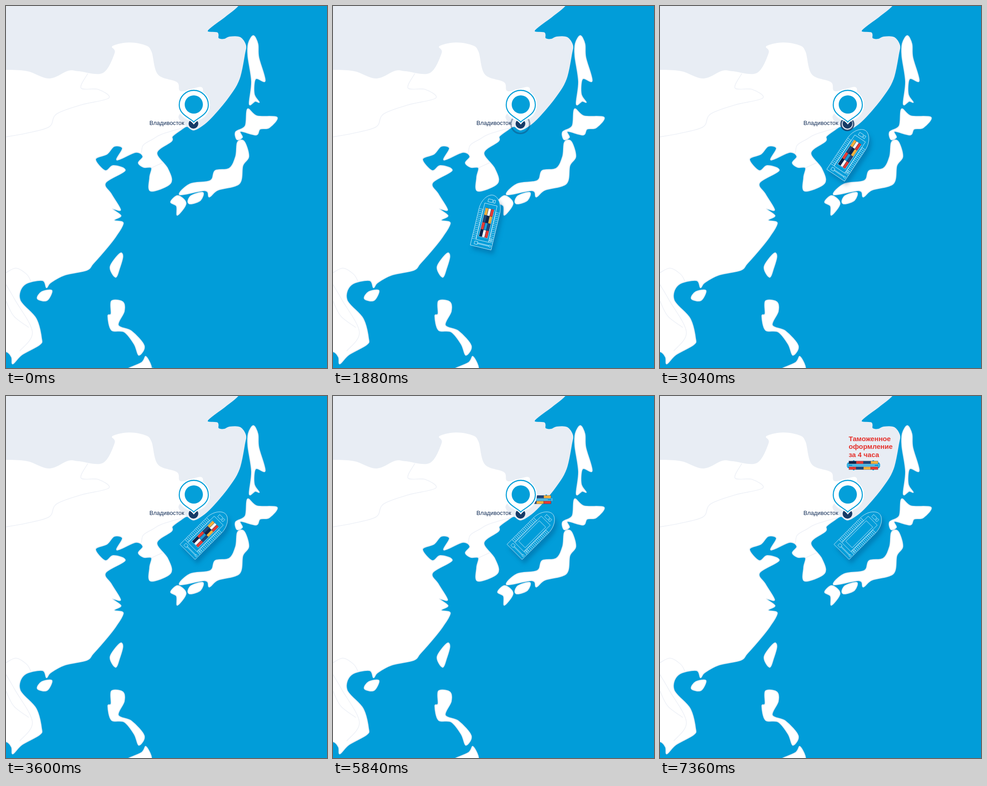
These frames come from a looping animation (706x794 px, 8000 ms). An HTML page:

```html
<!DOCTYPE html>
<html lang="ru">
<head>
<meta charset="utf-8">
<style>
html, body { margin: 0; width: 100%; height: 100%; overflow: hidden; background: #019dd9; }
svg { display: block; width: 706px; height: 794px; }
text { font-family: "Liberation Sans", Arial, sans-serif; }
.land { fill: #fff; stroke: #e5edf5; stroke-width: 1.8; stroke-linejoin: round; }
.border { fill: none; stroke: #eef1f7; stroke-width: 1.6; }
.lines { fill: none; stroke: #d5effb; stroke-width: .9; }
#float { filter: drop-shadow(5px 9px 5px rgba(0, 50, 100, .28)); }
</style>
</head>
<body>
<svg viewBox="0 0 706 794">
  <defs><path id="pin" d="M413 254.5C406 246 381 239 381 217A32 32 0 0 1 445 217C445 239 420 246 413 254.5Z"/></defs>
  <g id="map"></g>
  <text x="315.5" y="261" font-size="12.8" fill="#0f2b55">Владивосток</text>
  <circle id="pulse" cx="412" cy="259" fill="none" stroke="#163a66" stroke-width="3.4"/>
  <circle cx="412.3" cy="258.3" r="10.6" fill="#163a66"/>

  <g id="float"><g id="ship" class="lines">
    <path fill="#019dd9" d="M-23.5 59V-24C-23-44-11-59 0-59S23-44 23.5-24V59Z"/>
    <path d="M-14-38H14V44H-14ZM-10-28H10V36H-10Z"/>
    <path d="M-8-49H2V-42.5H-8ZM4-49H8V-42.5H4ZM-16 48H-9V54.5H-16ZM17 35H20V41H17Z"/>
    <path d="M-9 50.5H17M-9 52.3H17"/>
    <circle cx="19" cy="51.4" r="2.2"/>
    <path d="M-14.5-25V44M14.5-25V44"/>
    <path stroke-width="8" stroke-dasharray=".8 3.4" d="M-19-24V44M19-24V44"/>
  </g></g>

  <g id="cargo">
    <g id="wagon" fill="#079bd8">
      <path d="M-23-11h3v22h-3zM20-11h3v22h-3z"/>
      <path d="M-35-6H-32.5V6H-35ZM32.5-6H35V6H32.5ZM-36.5-3.5H36.5V3.5H-36.5Z"/>
      <path stroke="#d9f0fb" stroke-width=".9" d="M-32-2.6H32M-32 2.6H32M-34-3V3M34-3V3M-25 0H25"/>
    </g>
    <g id="middle"></g>
    <g id="strips"></g>
  </g>

  <circle cx="413" cy="217" r="35.5" fill="#fff"/>
  <use href="#pin" fill="#fff" stroke="#fff" stroke-width="7"/>
  <use href="#pin" fill="#fff" stroke="#049fd9" stroke-width="2.3"/>
  <circle cx="413" cy="216" r="20" fill="#049fd9"/>

  <g id="note" font-size="15.2" font-weight="bold" fill="#e5322d">
    <text x="415" y="99">Таможенное</text>
    <text x="415" y="116.3">оформление</text>
    <text x="415" y="133.6">за 4 часа</text>
  </g>
</svg>
<script>
const $ = id => document.getElementById(id);

// Smooth curve through "x,y x,y ..." points
function curve(text, closed) {
  const p = text.trim().split(/\s+/).map(s => s.split(',').map(Number)), k = p.length;
  const at = i => closed ? p[(i + k) % k] : p[Math.max(0, Math.min(k - 1, i))];
  let d = 'M' + p[0];
  for (let i = 0; i < (closed ? k : k - 1); i++) {
    const [a, b, c, e] = [at(i - 1), at(i), at(i + 1), at(i + 2)];
    const near = b.map((v, j) => v + (c[j] - a[j]) / 6);
    const far = c.map((v, j) => v - (e[j] - b[j]) / 6);
    d += `C${near} ${far} ${c}`;
  }
  return d + (closed ? 'Z' : '');
}

function add(parent, tag, attrs) {
  const el = document.createElementNS('http://www.w3.org/2000/svg', tag);
  for (const k in attrs) el.setAttribute(k, attrs[k]);
  $(parent).append(el);
}

// Key points of the coast, north to south
const northCoast = `510,0 482,23 443,54 465,59 467,71 480,73 492,68 515,69 527,86 525,104 513,160 490,199
  457,239 436,259 413,272 398,264`;
const eastCoast = `383,273 366,286 364,297 332,322 356,357 362,389 318,406 316,376 320,355 303,354 291,344 301,330
  285,321 244,338 256,312 238,308 222,325 197,336 218,361 236,350 262,361 219,388 232,413 252,447 234,445
  253,460 238,470 258,476 242,505 221,532 192,565 177,580 130,590 98,607 89,618 80,602 40,612 31,645
  66,685 78,728 74,743 35,765 15,785 12,770 0,758 -30,756`;
const northBorder = `383,252 383,236 425,205 430,178 385,187 376,167 334,150 320,100 306,86 270,80 234,88
  239,103 213,147 160,143 137,142 95,159 47,143 0,140 -30,141`;
const corner = '-30,-30 530,-30';

const islands = [
  '544,65 554,83 556,113 570,164 549,160 546,193 557,211 548,209 535,215 540,166 532,110 533,82',
  '531,226 552,241 596,244 579,267 559,270 550,283 516,275 520,288 508,293 505,276 526,263',
  `509,299 524,297 534,330 521,350 513,390 466,404 447,419 438,405 382,414 405,390 449,383 460,361
   491,356 505,330`,
  '400,430 407,416 433,409 428,426 408,434',
  '378,416 396,433 377,459 375,439 362,430',
  '250,543 257,549 250,575 241,595 229,572',
  '78,627 101,624 90,646 69,642',
  '232,647 257,649 260,670 247,700 276,713 304,745 292,766 282,742 260,715 232,711 224,680 231,675',
  '262,800 298,782 308,769 318,800'
];
const borders = [
  '180,148 165,180 203,183 226,202 165,217 111,237 95,265 45,279 0,287',
  '393,266 343,281 323,292 302,305 298,322',
  '320,355 346,343',
  '0,585 22,575 45,588 55,604',
  '0,611 20,645 58,715 30,757',
  '0,647 17,680 50,705'
];

const mainland = [northCoast, eastCoast, corner].join(' ');
const north = [northCoast, northBorder, corner].join(' ');
add('map', 'path', { class: 'land', d: curve(mainland, true) });
add('map', 'path', { fill: '#e8edf4', d: curve(north, true) });
borders.forEach(b => add('map', 'path', { class: 'border', d: curve(b) }));
islands.forEach(i => add('map', 'path', { class: 'land', d: curve(i, true) }));

// Containers, stern to bow
const paint = { N: '#10244a', D: '#1f4678', R: '#e63a33', Y: '#f5b13b', W: '#fff', B: '#1b9ad7' };
function row(parent, y, colors) {
  [...colors].forEach((c, i) => add(parent, 'rect',
    { x: i * 16 - 32, y, width: 16, height: 6, fill: paint[c], stroke: '#10244a', 'stroke-width': .4 }));
}
row('strips', -9.2, 'NRDY');
row('middle', -3, 'WBNW');
row('strips', 3.2, 'RDYR');

// Ship: time, x, y, heading
const route = [
  [0, 323, 853, -2], [1040, 319, 643, -.8], [1880, 338.5, 472.5, 13.5], [3040, 419, 322.3, 33.7], [3600, 441, 300.3, 45]
];
function shipAt(t) {
  const last = route.length - 1;
  if (t >= route[last][0]) return route[last].slice(1);
  const i = route.findIndex(k => k[0] > t) - 1;
  const slope = (n, c) => {
    if (n === last) return 0;
    const a = route[Math.max(0, n - 1)], b = route[n + 1];
    return (b[c] - a[c]) / (b[0] - a[0]);
  };
  const a = route[i], b = route[i + 1], span = b[0] - a[0], u = (t - a[0]) / span;
  return [1, 2, 3].map(c =>
    mix(a[c], b[c], u * u * (3 - 2 * u))
    + span * u * (1 - u) * (slope(i, c) * (1 - u) - slope(i + 1, c) * u));
}

const part = (t, from, to) => Math.max(0, Math.min(1, (t - from) / (to - from)));
const ease = u => u < .5 ? 2 * u * u : 1 - 2 * (1 - u) ** 2;
const mix = (a, b, u) => a + (b - a) * u;
const place = (id, x, y, angle) => $(id).setAttribute('transform', `translate(${x} ${y}) rotate(${angle})`);
const fade = (id, v) => $(id).setAttribute('opacity', v);

function draw(now) {
  const t = now % 8000;
  const [x, y, a] = shipAt(t), r = a * Math.PI / 180;
  place('ship', x, y, a);

  const turn = ease(part(t, 4360, 5460)), rise = ease(part(t, 4360, 7320));
  place('cargo', mix(x - 3.5 * Math.sin(r), 447.5, turn), mix(y + 3.5 * Math.cos(r), 152, rise), mix(a - 90, 0, turn));
  const swap = part(t, 4360, 4700);
  fade('middle', 1 - swap);
  fade('wagon', swap);

  // The pulse beats every 1440 ms until the cargo leaves
  const beat = t < 5400 ? ((t + 1400) % 1440) / 680 : 1;
  $('pulse').setAttribute('r', 11 + 16 * Math.min(1, beat));
  fade('pulse', Math.max(0, 1 - beat));
  fade('note', part(t, 6860, 7360));
  requestAnimationFrame(draw);
}
draw(performance.now());
</script>
</body>
</html>
```
